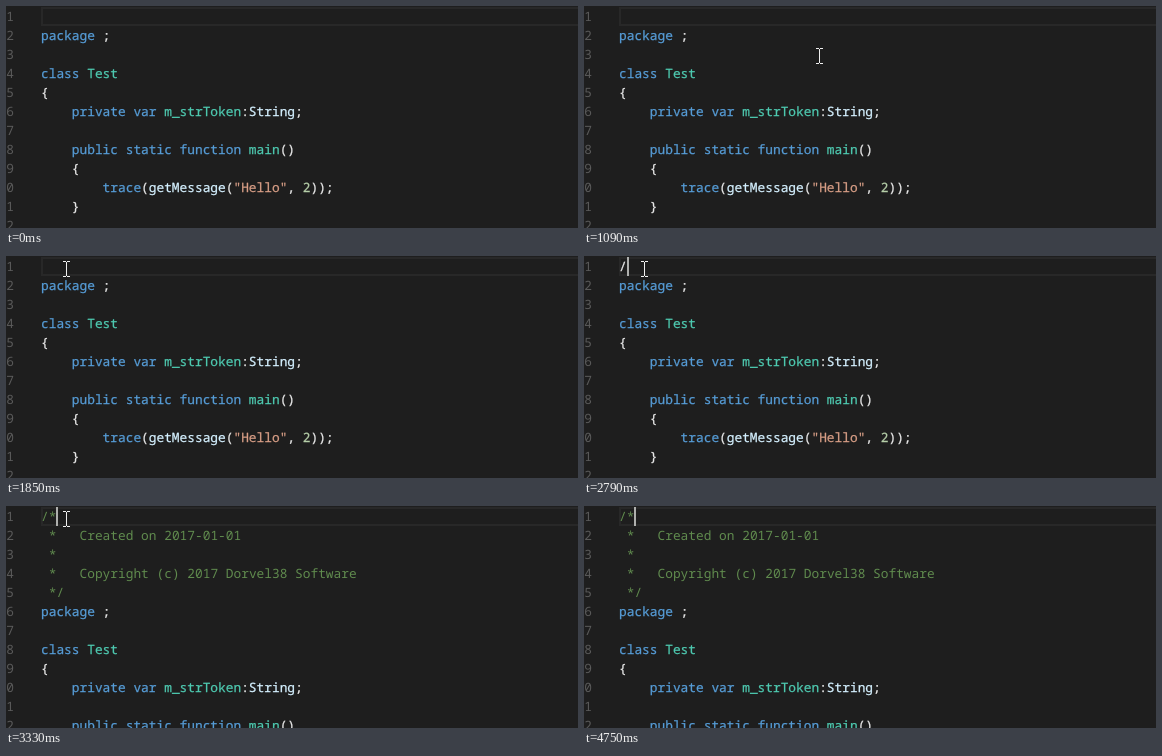
Write an HTML page that moves like this. It is 572 px wide and 222 px high and loops after 5.69 s.

```html
<!DOCTYPE html>
<html lang="en">
<head>
<meta charset="utf-8">
<title>Header comment snippet</title>
<style>
  html, body { margin: 0; width: 100%; height: 100%; overflow: hidden; background: #1e1e1e; }
  svg { display: block; width: 572px; height: 222px; }
  text {
    font: 12.83px "Noto Sans Mono", "DejaVu Sans Mono", monospace;
    white-space: pre;
    text-rendering: geometricPrecision;
    fill: var(--ink);
    --ink: #e8e8e8;
  }
  tspan { fill: var(--ink); }
  #code text, #code tspan, #typed { stroke: var(--ink); stroke-width: 0.25px; }
  .num { --ink: #5a5a5a; text-anchor: end; }
  .key { --ink: #569cd6; }
  .type { --ink: #4ec9b0; }
  .name { --ink: #d4f0ff; }
  .string { --ink: #d69d85; }
  .digit { --ink: #b5cea8; }
  .note { --ink: #608b4e; }
</style>
</head>
<body>
<svg viewBox="0 0 572 222">
  <rect x="36" y="2" width="540" height="17" fill="none" stroke="#282828" stroke-width="2"/>
  <g id="numbers"></g>
  <g id="header"></g>
  <g id="code"></g>
  <text id="typed" x="35" y="15"></text>
  <rect id="caret" y="1" width="2" height="19" fill="#aeafad"/>
  <path id="mouse" fill="#f0f0f0" d="M0 0h3v1h-3zM4 0h3v1h-3zM3 1h1v14h-1zM0 15h3v1h-3zM4 15h3v1h-3z"/>
</svg>
<script>
const LOOP = 5690, LEFT = 35, CHAR = 7.7, LINE = 19, BASE = 15;
const SLASH = 2790, STAR = 3260, EXPAND = 3330;
const $ = id => document.getElementById(id);

const header = [
  '/*',
  ' *   Created on 2017-01-01',
  ' *',
  ' *   Copyright (c) 2017 Dorvel38 Software',
  ' */'
];
const code = [
  'package ;',
  '',
  'class Test',
  '{',
  '    private var m_strToken:String;',
  '',
  '    public static function main()',
  '    {',
  '        trace(getMessage("Hello", 2));',
  '    }'
];

const rules = {
  key: /^(package|class|private|var|public|static|function|trace)$/,
  type: /^(Test|m_strToken|main)$/,
  name: /^(String|getMessage)$/,
  string: /^"/,
  digit: /^\d/
};
const styleOf = word => Object.keys(rules).find(k => rules[k].test(word)) || '';

function add(tag, parent, attrs, content = '') {
  const el = document.createElementNS('http://www.w3.org/2000/svg', tag);
  for (const k in attrs) el.setAttribute(k, attrs[k]);
  el.textContent = content;
  parent.append(el);
  return el;
}

function addLine(group, row, line, style) {
  const indent = line.search(/\S/);
  if (indent < 0) return;
  const el = add('text', group, { x: LEFT + indent * CHAR, y: BASE + row * LINE });
  for (const part of line.trim().match(/"[^"]*"|\w+|\W/g)) {
    add('tspan', el, { class: style || styleOf(part) }, part);
  }
}

for (let i = 0; i < 12; i++) {
  add('text', $('numbers'), { class: 'num', x: 8, y: BASE + i * LINE }, String((i + 1) % 10));
}
header.forEach((line, i) => addLine($('header'), i, line, 'note'));
code.forEach((line, i) => addLine($('code'), i, line));

// The pointer follows each curve from start to end, then rests until it hides
const moves = [
  { start: 140, end: 300, hide: 1090, curve: [[455, 136], [332, 75]] },
  { start: 1090, end: 1610, hide: 1690, curve: [[232, 42], [60, 192], [-35, 192], [59, 11]] },
  { start: 1690, end: 1850, hide: 4190, curve: [[58, 9], [57, 5]] },
  { start: 4430, end: 4670, hide: 4750, curve: [[89, 41], [172, 167]] }
];

const mix = (a, b, u) => a.map((v, i) => v + (b[i] - v) * u);

// De Casteljau: lines and Bezier curves alike
function bezier(points, u) {
  while (points.length > 1) points = points.slice(1).map((p, i) => mix(points[i], p, u));
  return points[0];
}

// Movement is seen in even steps of about 80 ms
function pointer(t) {
  const m = moves.find(m => t >= m.start && t < m.hide);
  if (!m) return null;
  const span = m.end - m.start, steps = Math.round(span / 78);
  const u = Math.min(1, Math.floor((t - m.start) / span * steps + 0.05) / steps);
  return bezier(m.curve, u).map(Math.round);
}

const show = (el, on) => el.setAttribute('visibility', on ? 'visible' : 'hidden');

function draw(t) {
  const place = pointer(t), open = t >= EXPAND;
  const count = (t >= SLASH) + (t >= STAR);
  show($('mouse'), place);
  if (place) $('mouse').setAttribute('transform', `translate(${place})`);
  $('typed').textContent = open ? '' : '/*'.slice(0, count);
  show($('caret'), count);
  $('caret').setAttribute('x', Math.round(LEFT + count * CHAR));
  show($('header'), open);
  $('code').setAttribute('transform', `translate(0 ${(open ? header.length : 1) * LINE})`);
}

const start = performance.now();
function tick() {
  draw((performance.now() - start) % LOOP);
  requestAnimationFrame(tick);
}
tick();
</script>
</body>
</html>
```
